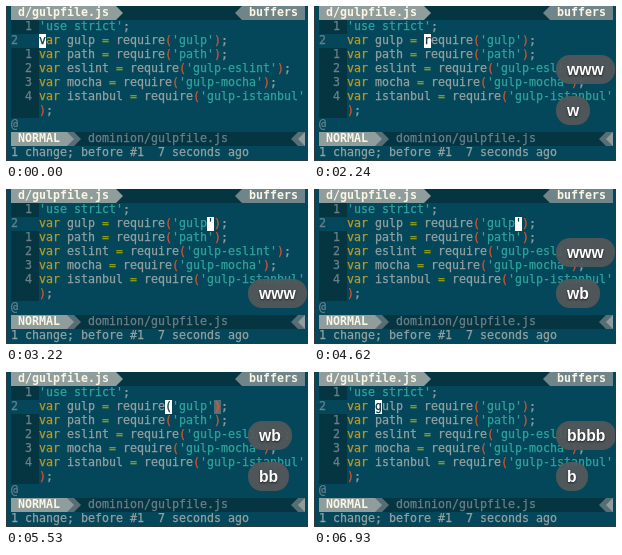
Animation, 302 px wide and 155 px high, one loop 7630 ms. Source, as an HTML page:

```html
<!DOCTYPE html>
<html lang="en">
<head>
<meta charset="utf-8">
<title>Vim word motions</title>
<style>
  html, body { margin: 0; width: 100%; height: 100%; overflow: hidden; background: #05475a; }
  #stage { position: relative; width: 302px; height: 155px; overflow: hidden; }
  #stage > * { position: absolute; }
  #edge { inset: 0; border: solid #2a3a40; border-width: 0 1px 1px; }
  pre, .cell {
    margin: 0; white-space: pre; color: #93a1a0;
    font: 11.63px/14px "DejaVu Sans Mono", monospace;
    -webkit-text-stroke: .25px currentColor;
  }
  pre { left: 5px; top: -1px; }
  .cell { top: 28px; width: 7px; height: 14px; line-height: 12px; }
  #cursor { background: #fff; color: #12343f; }
  #match { left: 208px; background: #586e75; color: #d9532f; font-weight: bold; }
  .bar { height: 14px; }
  .right { clip-path: polygon(0 0, 100% 50%, 0 100%); }
  .left { clip-path: polygon(100% 0, 0 50%, 100% 100%); }
  b { color: #fbf5e4; -webkit-text-stroke: 0; }
  .k { color: #bd9a20; }
  .o { color: #8f9f10; }
  .p { color: #d9532f; }
  .s { color: #2fa39b; }
  .n { color: #68808a; }
  .bubble {
    left: 242px; height: 29px; padding: 0 11px; border-radius: 14px;
    background: rgba(84, 88, 90, .93); color: #fff; white-space: pre;
    font: bold 15.7px/29px "Liberation Sans", sans-serif;
    text-shadow: 0 1px 2px #222;
  }
  #upper { top: 49px; }
  #lower { top: 90px; }
</style>
</head>
<body>
<div id="stage"></div>
<script>
const LOOP = 7630, LEFT = 5, COL = 7, ROW = 14;
const LIGHT = '#8f9d9c', GRAY = '#70858a', MID = '#586e75', DARK = '#063542';
const stage = document.getElementById('stage');

function add(tag, props) {
  return stage.appendChild(Object.assign(document.createElement(tag), props));
}

function bar(col, row, cols, color, rows = 1, shape = '') {
  const el = add('div', { className: 'bar ' + shape });
  Object.assign(el.style, {
    left: LEFT + col * COL + 'px', top: row * ROW + 'px',
    width: cols * COL + 'px', height: rows * ROW + 'px', background: color
  });
}

const span = (cls, text) => `<span class="${cls}">${text}</span>`;

function requireLine(number, name, module, end = ');') {
  const tail = end && span('p', ')') + ';';
  return `${span('n', number)} ${span('k', 'var')} ${name} ${span('o', '=')} require` +
    span('p', '(') + span('s', `'${module}'`) + tail;
}

// Gutter (clear on the current line), tab line and status line
bar(0, 1, 4, DARK);
bar(0, 3, 4, DARK, 5);
bar(0, 0, 42, DARK);
bar(0, 0, 15, LIGHT);
bar(15, 0, 1, LIGHT, 1, 'right');
bar(32, 0, 1, GRAY, 1, 'left');
bar(33, 0, 9, GRAY);
bar(0, 9, 42, DARK);
bar(0, 9, 8, LIGHT);
bar(8, 9, 1, MID);
bar(8, 9, 1, LIGHT, 1, 'right');
bar(9, 9, 1, MID, 1, 'right');
bar(40, 9, 1, MID, 1, 'left');
bar(41, 9, 1, MID);
bar(41, 9, 1, LIGHT, 1, 'left');

add('pre', { innerHTML: [
  ' <b>d/gulpfile.js</b>' + ' '.repeat(20) + '<b>buffers</b>',
  span('n', '  1') + ' ' + span('s', "'use strict'") + ';',
  requireLine('2  ', 'gulp', 'gulp'),
  requireLine('  1', 'path', 'path'),
  requireLine('  2', 'eslint', 'gulp-eslint'),
  requireLine('  3', 'mocha', 'gulp-mocha'),
  requireLine('  4', 'istanbul', 'gulp-istanbul', ''),
  '    ' + span('p', ')') + ';',
  span('n', '@'),
  ' <b>NORMAL</b>    ' + span('n', 'dominion/gulpfile.js'),
  '1 change; before #1  7 seconds ago'
].join('\n') });

const match = add('div', { id: 'match', className: 'cell', textContent: ')' });
const cursor = add('div', { id: 'cursor', className: 'cell' });
const upper = add('div', { id: 'upper', className: 'bubble' });
const lower = add('div', { id: 'lower', className: 'bubble' });
add('div', { id: 'edge' });

const CODE = "    var gulp = require('gulp');";
const PAREN = CODE.indexOf('(');

// [time, cursor column]
const moves = [
  [0, 4], [420, 8], [630, 13], [980, 15], [2310, 22], [2520, 24], [2870, 28],
  [5110, 24], [5530, 22], [6020, 15], [6440, 13], [6930, 8]
];
// [time, newest keys, previous keys]
const keys = [
  [0, '', ''], [420, 'w', ''], [560, 'ww', ''], [910, 'www', ''],
  [2240, 'w', 'www'], [2520, 'ww', 'www'], [2800, 'www', 'www'], [3220, 'www', ''],
  [4620, 'wb', 'www'], [5110, 'b', 'wb'], [5460, 'bb', 'wb'],
  [6020, 'bbb', 'wb'], [6440, 'bbbb', 'wb'], [6930, 'b', 'bbbb']
];
const fades = [3010, 4900, 6720];
const FADE_STEP = 70;

const latest = (list, t) => list.findLast(([time]) => time <= t);

function show(bubble, text, opacity = 1) {
  bubble.textContent = text;
  bubble.style.display = text ? 'block' : 'none';
  bubble.style.opacity = opacity;
}

function draw(now) {
  const t = now % LOOP;
  const [, col] = latest(moves, t);
  cursor.style.left = LEFT + col * COL + 'px';
  cursor.textContent = CODE[col];
  match.style.display = col === PAREN ? 'block' : 'none';

  const [, newest, previous] = latest(keys, t);
  const fade = fades.find(start => t >= start && t < start + 3 * FADE_STEP);
  const step = fade === undefined ? 0 : 1 + Math.floor((t - fade) / FADE_STEP);
  show(upper, previous, 1 - step / 4);
  show(lower, newest);
  requestAnimationFrame(() => draw(performance.now() - origin));
}

const origin = performance.now();
draw(0);
</script>
</body>
</html>
```
